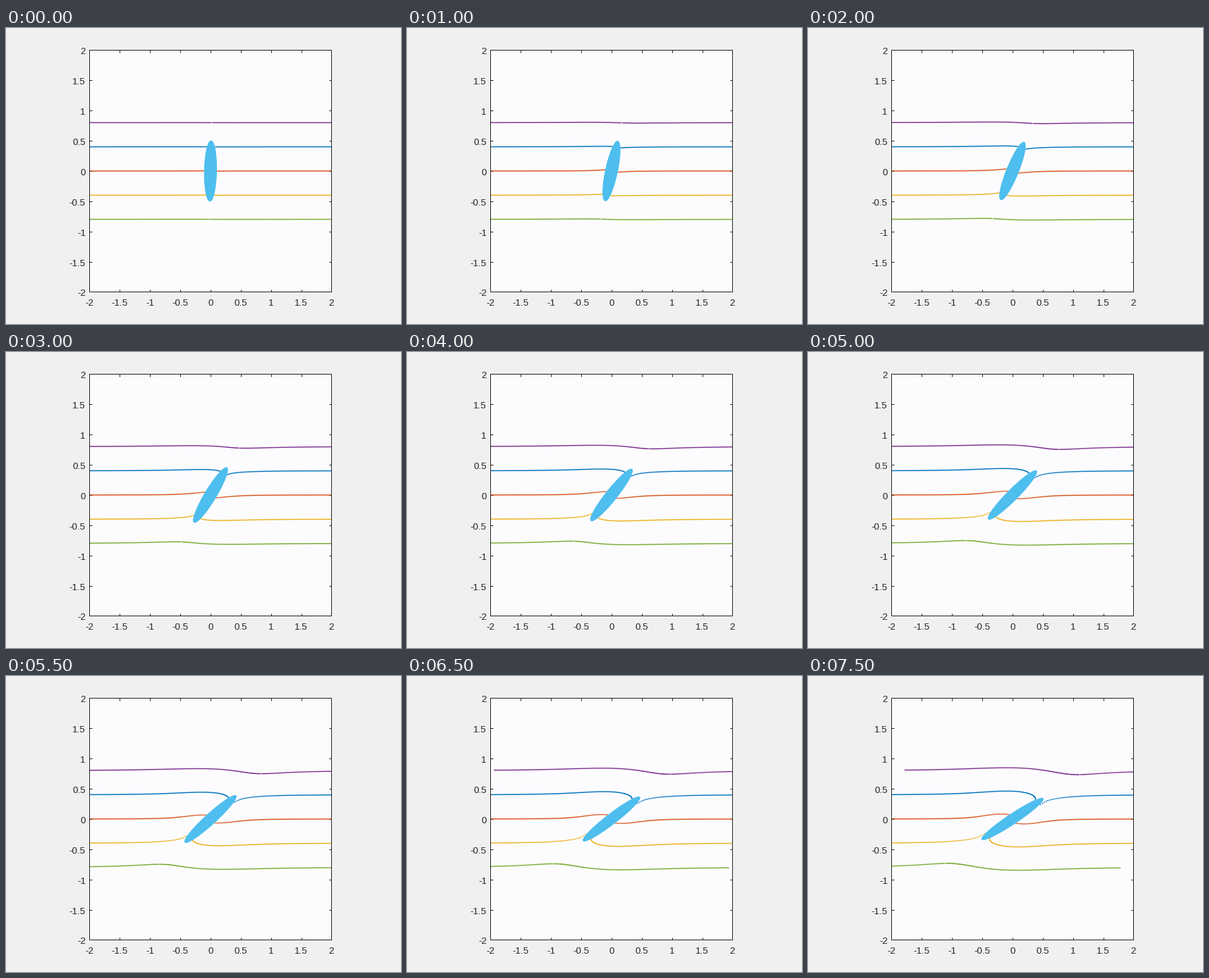
A matplotlib script that plays this animation: 560x420 px, repeating every 8 s.

```python
import numpy as np
import matplotlib.pyplot as plt
from matplotlib.animation import FuncAnimation
from matplotlib.transforms import ScaledTranslation

W, H, DPI = 560, 420, 100
FRAMES, STEP_MS = 16, 500
SHEAR = 0.1        # shear rate per frame
SOFTNESS = 0.33    # share of the outer strain felt by the drop
LEAD = 0.2         # time elapsed before the first frame, in frames
SUBSTEPS = 8
START = np.array([np.pi / 2, 0.5, 0.1])    # angle, long and short half-axes
INK = "#262626"
px = 72 / DPI

LINES = [(0.8, "#7e2f8e"), (0.4, "#0072bd"), (0.0, "#d95319"),
         (-0.4, "#edb120"), (-0.8, "#77ac30")]


def seed_line(y):
    half = 0.015 + 0.02 * np.arange(149)
    x = np.concatenate([-half[::-1], half])
    _, a, b = START
    outside = (x / b) ** 2 + (y / a) ** 2 >= 1
    return x[outside] + 1j * y


def rates(z, shape):
    """Stokes flow at points z around a soft ellipse, and the ellipse's change."""
    angle, a, b = shape
    turn = np.exp(1j * angle)
    strain = 0.5j * SHEAR * turn ** -2
    stretch = SOFTNESS * strain.real
    A = strain - stretch
    R, lam = (a + b) / 2, (a - b) / (a + b)
    spin = 2 * lam * A.imag / (1 + lam ** 2)

    body = z / turn
    q, focus = body / R, 2 * np.sqrt(lam)
    zeta = (q + np.sqrt(q - focus) * np.sqrt(q + focus)) / 2
    zeta = zeta * np.maximum(1, 1 / np.abs(zeta))
    s = 1 / np.conj(zeta)
    c = R * (1j * spin * lam - A)
    cc = np.conj(c)
    den = 1 - lam * s ** 2
    flow = (c / zeta + cc * body * s ** 2 / (R * den)
            - cc * s * (s ** 2 + lam) / den + (1j * spin - A * lam) * R * s)
    velocity = SHEAR * z.imag + flow * turn
    return velocity, np.array([spin - SHEAR / 2, stretch * a, -stretch * b])


def advance(z, shape, duration):
    h = duration / SUBSTEPS
    for _ in range(SUBSTEPS):
        v1, e1 = rates(z, shape)
        v2, e2 = rates(z + h / 2 * v1, shape + h / 2 * e1)
        v3, e3 = rates(z + h / 2 * v2, shape + h / 2 * e2)
        v4, e4 = rates(z + h * v3, shape + h * e3)
        z = z + h / 6 * (v1 + 2 * v2 + 2 * v3 + v4)
        shape = shape + h / 6 * (e1 + 2 * e2 + 2 * e3 + e4)
    return z, shape


def simulate():
    seeds = [seed_line(y) for y, _ in LINES]
    cuts = np.cumsum([len(s) for s in seeds])[:-1]
    z, shape = advance(np.concatenate(seeds), START, LEAD)
    states = []
    for _ in range(FRAMES):
        states.append((np.split(z, cuts), shape))
        z, shape = advance(z, shape, 1)
    return states


states = simulate()

plt.rcParams["font.family"] = "Liberation Sans"
plt.rcParams["path.simplify"] = False
fig = plt.figure(figsize=(W / DPI, H / DPI), dpi=DPI, facecolor="#f0f0f0")
ax = fig.add_axes([118.4 / W, 45.6 / H, 343 / W, 343 / H], facecolor="#fcfcfe")
ax.set(xlim=(-2, 2), ylim=(-2, 2))
ticks = np.arange(-2, 2.5, 0.5)
labels = [f"{t:g}" for t in ticks]
ax.set_xticks(ticks, labels)
ax.set_yticks(ticks, labels)
ax.tick_params(direction="in", top=True, right=True, length=3.5 * px, width=px,
               color=INK, labelcolor=INK, labelsize=13.33 * px)
ax.tick_params(axis="x", pad=10.5 * px)
ax.tick_params(axis="y", pad=5.5 * px)
lower = ScaledTranslation(0, -1.5 / DPI, fig.dpi_scale_trans)
for label in ax.get_yticklabels():
    label.set_transform(label.get_transform() + lower)
for spine in ax.spines.values():
    spine.set(linewidth=px, color=INK)

# Each dot is a tiny round-capped dash, so it can sit between pixels.
dots = [ax.plot([], [], color=color, linewidth=1.8 * px,
                solid_capstyle="round", snap=False)[0] for _, color in LINES]
drop = ax.fill([0], [0], color="#4dbeee", linewidth=px, zorder=3)[0]
ring = np.linspace(0, 2 * np.pi, 181)


def draw(i):
    tracks, (angle, a, b) = states[i]
    for dot, z in zip(dots, tracks):
        x = np.column_stack([z.real, z.real + 1e-3, np.full(len(z), np.nan)])
        dot.set_data(x.ravel(), np.repeat(z.imag, 3))
    edge = (a * np.cos(ring) + 1j * b * np.sin(ring)) * np.exp(1j * angle)
    drop.set_xy(np.column_stack([edge.real, edge.imag]))
    return [*dots, drop]


anim = FuncAnimation(fig, draw, frames=FRAMES, interval=STEP_MS,
                     repeat=True, repeat_delay=0)
plt.show()
```
